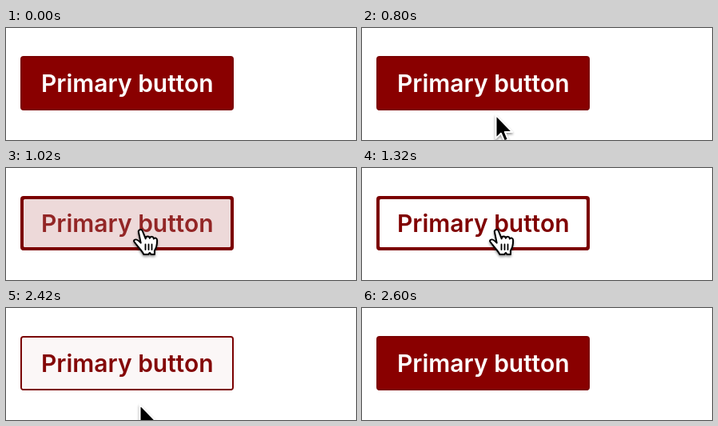
An HTML page that plays this animation: 438x140 px, repeating every 2.92 s.

```html
<!DOCTYPE html>
<html lang="en">
<head>
<meta charset="utf-8">
<title>Button hover</title>
<style>
  html, body { margin: 0; width: 100%; height: 100%; overflow: hidden; background: #fff; }
  svg { display: block; }
  text { font: 600 30px Inter, "Liberation Sans", sans-serif; }
  #cursor { filter: drop-shadow(0 2px 1.5px rgba(0, 0, 0, .4)); }
</style>
</head>
<body>
<svg width="438" height="140" viewBox="0 0 438 140">
  <rect x="18" y="35" width="267" height="68" rx="4" fill="#7b0000"/>
  <rect id="face"/>
  <text id="label" x="44" y="80">Primary button</text>
  <g id="cursor" stroke-linejoin="round" stroke-linecap="round">
    <path id="arrow" fill="#000" stroke="#fff" stroke-width="2"
      d="M0 0V29L6.4 22.8L10.6 32.6L15.4 30.6L11.3 21H20.5Z"/>
    <g id="hand" stroke="#000" stroke-width="2">
      <path fill="#fff" d="M-1.6 3C-2.4 .2 2 -1.2 3.4 1.8L7.2 11.4
        C7.4 7.6 11.8 7.4 12.4 10.8C13.2 8 17 8.2 17.4 11.6
        C18.6 9.6 21.8 10.4 21.6 14C21.6 20 20.6 23 18.4 26.2V31H14.2
        L12.4 29L10.6 31H4.8C3.6 27.4 -1.4 23 -3.8 19.4
        C-6.8 15.8 -8.6 14.2 -6.6 12.8C-4.2 11.2 -1.6 13.6 1.2 16.6Z"/>
      <path fill="none" stroke-width="1.8" d="M7 18.5V25M11 18.5V25M15 18.5V25"/>
    </g>
  </g>
</svg>
<script>
  const LOOP = 2920, FADE = 200, ENTER = 870, LEAVE = 2400;
  const RED = [137, 0, 0], DARK = [128, 0, 0], WHITE = [255, 255, 255];
  // [time, cursor tip y]
  const PATH = [[680, 146], [800, 109], [870, 102], [980, 77], [2300, 77], [2400, 104], [2420, 120], [2450, 146]];
  const $ = id => document.getElementById(id);
  const clamp = v => Math.min(1, Math.max(0, v));
  const smooth = p => p * p * (3 - 2 * p);
  const mix = (a, b, p) => `rgb(${a.map((v, i) => Math.round(v + (b[i] - v) * p))})`;
  const set = (el, attrs) => Object.entries(attrs).forEach(([k, v]) => el.setAttribute(k, v));

  function tipY(t) {
    let y = PATH[0][1];
    for (let i = 1; i < PATH.length; i++) {
      const [t0, y0] = PATH[i - 1], [t1, y1] = PATH[i];
      if (t >= t0) y = y0 + (y1 - y0) * clamp((t - t0) / (t1 - t0));
    }
    return y;
  }

  function draw(t) {
    const hovered = t >= ENTER && t < LEAVE;
    const light = smooth(clamp((t - ENTER) / FADE)) - smooth(clamp((t - LEAVE) / FADE));
    const edge = hovered ? 4 : 2;
    set($('face'), {
      x: 18 + edge, y: 35 + edge, width: 267 - 2 * edge, height: 68 - 2 * edge,
      rx: 1.5, fill: mix(RED, WHITE, light)
    });
    set($('label'), { fill: mix(WHITE, DARK, light) });
    set($('cursor'), { transform: `translate(167.5 ${tipY(t)})` });
    $('arrow').style.display = hovered ? 'none' : '';
    $('hand').style.display = hovered ? '' : 'none';
  }

  const start = performance.now();
  function tick() {
    draw((performance.now() - start) % LOOP);
    requestAnimationFrame(tick);
  }
  tick();
</script>
</body>
</html>
```
